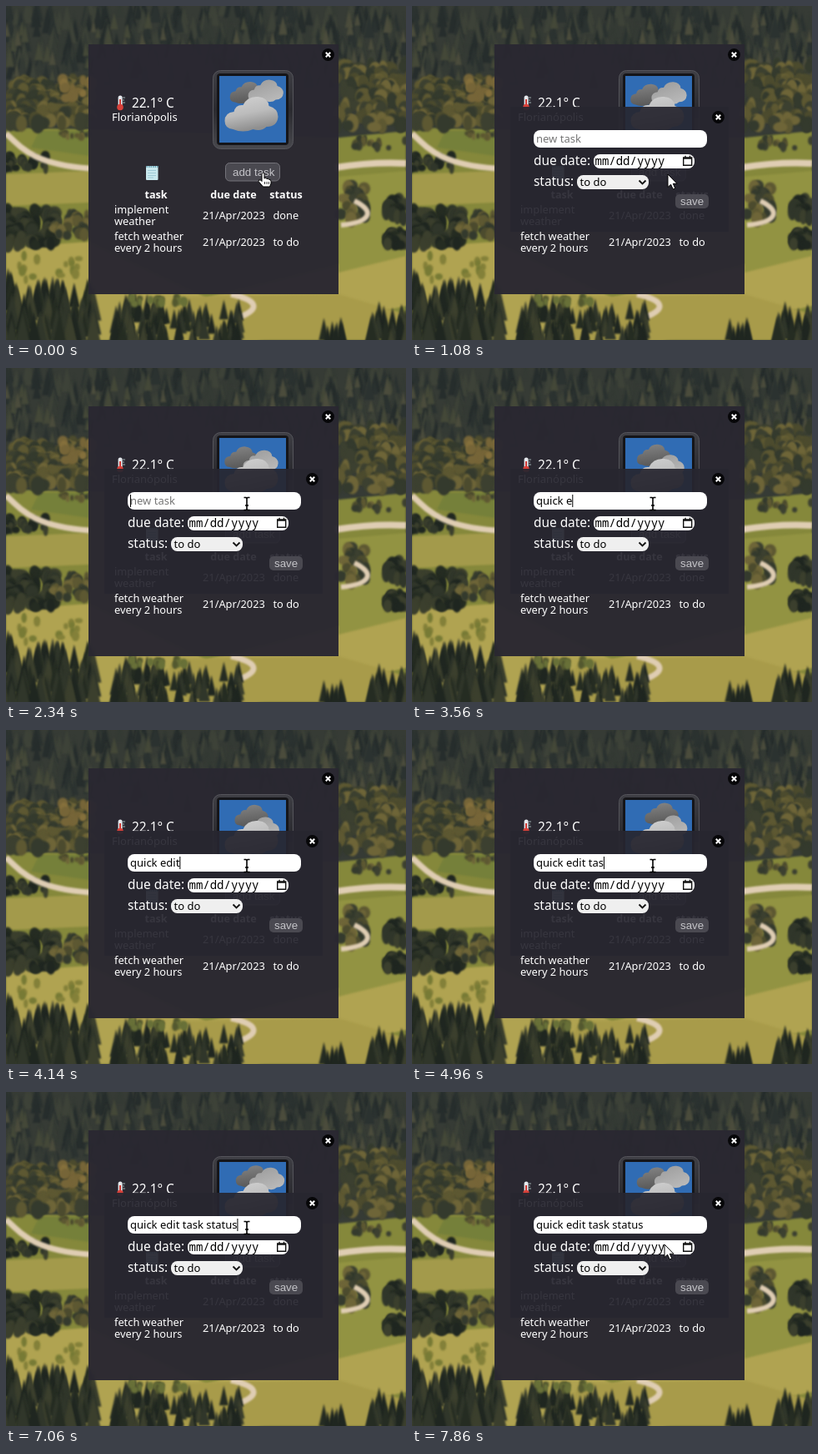
Recreate the animation shown at these times as an HTML page with a canvas. Size 480 by 401 pixels, loop 8 s.

```html
<!DOCTYPE html>
<html lang="en">
<head>
<meta charset="utf-8">
<title>Weather and tasks</title>
<style>
html, body { margin: 0; width: 100%; height: 100%; overflow: hidden; background: #3b3d33; }
canvas, svg { position: absolute; left: 0; top: 0; width: 480px; height: 401px; }
text { font: 12.8px "Noto Sans", "Open Sans", sans-serif; fill: #fff; white-space: pre; }
.big { font-size: 15.4px; }
.head { font-weight: bold; font-size: 12.6px; text-anchor: middle; }
.btn { font: 13.33px "Liberation Sans", Arial, sans-serif; fill: #c4c4c8; }
.field { font-size: 13px; fill: #000; }
.mono { font: 14px "Noto Sans Mono", "DejaVu Sans Mono", monospace; fill: #000; }
</style>
</head>
<body>
<canvas id="photo" width="480" height="401"></canvas>
<svg viewBox="0 0 480 401">
  <defs>
    <linearGradient id="light" x2=".3" y2="1"><stop stop-color="#d2d2d2"/><stop offset=".55" stop-color="#bcbcbc"/><stop offset="1" stop-color="#8f8f8f"/></linearGradient>
    <linearGradient id="mid" x2=".6" y2="1"><stop stop-color="#999"/><stop offset="1" stop-color="#b9b9b9"/></linearGradient>
    <linearGradient id="dark" x2=".2" y2="1"><stop stop-color="#858585"/><stop offset="1" stop-color="#5a5a5a"/></linearGradient>
    <linearGradient id="rim" x2="0" y2="1"><stop stop-color="#3f3f45"/><stop offset=".5" stop-color="#2b2b30"/><stop offset="1" stop-color="#48484d"/></linearGradient>
    <clipPath id="sky"><rect x="256" y="84" width="80" height="80"/></clipPath>
    <path id="cloud" d="M10 40Q0 39 0 30Q0 20 11 19Q13 10 22 11Q27 0 40 1Q52 2 53 12Q64 15 64 25Q63 37 50 37Q44 43 34 40Q22 45 10 40Z"/>
    <g id="close"><circle r="7.4" fill="#060608"/><path d="M-2.7-2.7 2.7 2.7M2.7-2.7-2.7 2.7" stroke="#fff" stroke-width="2"/></g>
  </defs>

  <rect x="99" y="46" width="300" height="300" fill="#2a2831" fill-opacity=".97"/>
  <use href="#close" x="386.5" y="58.5"/>

  <g>
    <rect x="134.6" y="107.5" width="5" height="14" rx="2.5" fill="#e6eaee"/>
    <path d="M137 112v8" stroke="#cf3a35" stroke-width="2"/>
    <path d="M140 110h3M140 113h2M140 116h3" stroke="#9aa"/>
    <circle cx="137" cy="121.5" r="3.8" fill="#d8413a"/>
  </g>
  <text class="big" x="151" y="121.5">22.1° C</text>
  <text x="127" y="138" style="font-size:13px">Florianópolis</text>

  <rect x="248.5" y="77.5" width="96" height="94" rx="9" fill="url(#rim)" stroke="#55555b"/>
  <rect x="253" y="81" width="86" height="86" rx="4" fill="#151519"/>
  <rect x="256" y="84" width="80" height="80" fill="#306cb4"/>
  <g clip-path="url(#sky)">
    <use id="darkCloud" href="#cloud" fill="url(#dark)"/>
    <use id="midCloud" href="#cloud" fill="url(#mid)"/>
    <use href="#cloud" x="262.5" y="108" fill="url(#light)"/>
  </g>

  <g>
    <rect x="168" y="192" width="14.5" height="17" rx="1" fill="#c9e9ee"/>
    <path d="M168.5 193h14" stroke="#6aa3b5" stroke-width="2" stroke-dasharray="1.5 1"/>
    <path d="M170 197.5h10M170 200.5h10M170 203.5h10M170 206h7" stroke="#93c3d0" stroke-width=".8"/>
  </g>
  <rect id="add" x="263.5" y="188.5" width="65" height="21.5" rx="5" fill="#4a4950" stroke="#74737a"/>
  <text class="btn" x="272" y="204">add task</text>

  <text class="head" x="180" y="231">task</text>
  <text class="head" x="273" y="231">due date</text>
  <text class="head" x="336" y="231">status</text>
  <text x="130" y="249">implement</text><text x="130" y="263">weather</text>
  <text x="236" y="256">21/Apr/2023</text><text x="320.5" y="256">done</text>
  <text x="130" y="281">fetch weather</text><text x="130" y="295">every 2 hours</text>
  <text x="236" y="288">21/Apr/2023</text><text x="320.5" y="288">to do</text>

  <g id="form">
    <rect x="118" y="121" width="262" height="150" fill="#272630" fill-opacity=".93"/>
    <use href="#close" x="367.5" y="133.5"/>
    <rect x="146" y="149" width="208" height="21" rx="8" fill="#fff"/>
    <text id="entry" class="field" x="149" y="164"></text>
    <rect id="caret" y="152" width="1" height="15"/>
    <text class="big" x="146" y="191">due date:</text>
    <rect x="218" y="178" width="121" height="17" rx="7.5" fill="#fff"/>
    <text class="mono" x="219.5" y="191">mm/dd/yyyy</text>
    <path d="M325.7 182h10v9.3h-10zM325.7 183h10M328 179.8v2M333.5 179.8v2" fill="none" stroke="#111" stroke-width="1.4"/>
    <text class="big" x="146" y="216">status:</text>
    <rect x="198" y="203" width="86" height="17" rx="7.5" fill="#efefef"/>
    <text class="field" x="201.5" y="216">to do</text>
    <path d="M272.5 209.5l4 4 4-4" fill="none" stroke="#111" stroke-width="1.8"/>
    <rect x="316" y="226" width="40" height="17" rx="5" fill="#4a4951"/>
    <text class="btn" x="322" y="239">save</text>
  </g>

  <g id="hand" transform="translate(307,200)" fill="#fff" stroke="#000">
    <path d="M0 1.5Q1.5-1 3 1.5V7Q5 5.500 6 7.500Q8 6.500 8.700 8.500Q11 8 11 10.500V13L9.500 17H1.500L-4 10.500Q-4 8 -1.500 9L0 10.500Z"/>
    <path d="M3.500 11v3M6 11v3M8.300 11v3" stroke-width=".8"/>
  </g>
  <path id="arrow" d="M0 0V15.500L3.600 12.200 6.200 18 8.800 16.900 6.300 11.300H11Z" fill="#fff" stroke="#000"/>
  <path id="beam" d="M-3.500-7.500H-1L0-6.500 1-7.500H3.500M0-6.500V6.500M-3.500 7.500H-1L0 6.500 1 7.500H3.500M-2 2H2" fill="none" stroke="#000" stroke-width="1.6"/>
</svg>
<script>
const $ = id => document.getElementById(id);

// Landscape in soft flat shapes
function paintPhoto() {
  const c = $('photo').getContext('2d');
  let seed = 7;
  const rnd = (a, b) => {
    seed = (seed * 16807) % 2147483647;
    return a + (b - a) * seed / 2147483647;
  };
  const pick = list => list[Math.floor(rnd(0, list.length))];
  const poly = (color, ...p) => {
    c.fillStyle = color;
    c.beginPath();
    for (let i = 0; i < p.length; i += 2) c.lineTo(p[i], p[i + 1]);
    c.fill();
  };
  const road = (width, ...p) => {
    c.strokeStyle = '#dfcdb3';
    c.lineWidth = width;
    c.beginPath();
    c.moveTo(p[0], p[1]);
    c.bezierCurveTo(...p.slice(2));
    c.stroke();
  };
  const bushes = (n, x0, y0, x1, y1, r, colors) => {
    for (let i = 0; i < n; i++) {
      c.fillStyle = pick(colors);
      c.beginPath();
      c.ellipse(rnd(x0, x1), y0 + (y1 - y0) * i / n, r * rnd(.5, 1), r * rnd(.6, 1.3), 0, 0, 7);
      c.fill();
    }
  };
  const firs = (n, x0, y0, x1, y1, h, colors) => {
    for (let i = 0; i < n; i++) {
      const x = rnd(x0, x1), y = y0 + (y1 - y0) * i / n, s = h * rnd(.7, 1.2);
      poly(pick(colors), x, y - s, x + s * .3, y + s * .3, x - s * .3, y + s * .3);
    }
  };
  const night = ['#2b3230', '#343a34', '#3d4238', '#262d2c'];
  const olive = ['#4c4b2e', '#5d5832', '#3c4030', '#6e6538', '#343a2d'];
  const deep = ['#252c22', '#30362a', '#1f2620', '#3b3f2d'];

  c.filter = 'blur(.8px)';
  c.fillStyle = '#363b35';
  c.fillRect(0, 0, 480, 401);
  firs(420, 0, 5, 480, 95, 20, night);
  firs(60, 0, 20, 480, 90, 15, ['#4b4c3c', '#444838']);
  poly('#85883b', 0, 146, 100, 148, 400, 158, 480, 150, 480, 401, 0, 401);
  poly('#a39a4b', 0, 202, 100, 198, 100, 236, 0, 240);
  poly('#75803a', 40, 150, 100, 150, 100, 180, 30, 170);
  poly('#b0a351', 0, 290, 100, 283, 240, 350, 480, 290, 480, 360, 300, 401, 60, 401, 0, 350);
  poly('#929342', 399, 205, 480, 198, 480, 300, 399, 320);
  poly('#a89b4a', 200, 350, 399, 346, 480, 370, 480, 401, 180, 401);
  bushes(170, 0, 92, 105, 142, 9, olive);
  bushes(130, 395, 70, 485, 146, 9, olive);
  bushes(14, 68, 88, 104, 112, 7, ['#85703c', '#766538']);
  bushes(26, 0, 180, 48, 196, 6, deep);
  bushes(12, 60, 152, 100, 158, 4, olive);
  bushes(75, 0, 246, 60, 288, 9, deep);
  bushes(35, 58, 250, 99, 276, 7, olive);
  bushes(14, 404, 160, 480, 171, 5, olive);
  bushes(26, 400, 216, 432, 258, 8, olive);
  bushes(16, 455, 232, 480, 256, 8, deep);
  bushes(20, 457, 272, 480, 288, 8, deep);
  bushes(18, 0, 300, 90, 330, 5, ['#838039', '#777a35']);
  road(7, 0, 153, 20, 172, 35, 190, 100, 195);
  road(8, 395, 194, 420, 190, 445, 187, 480, 189);
  road(6, 402, 263, 436, 260, 445, 247, 418, 234);
  road(7, 270, 346, 302, 353, 310, 365, 270, 377);
  firs(90, -5, 350, 105, 405, 31, deep);
  firs(42, 130, 366, 185, 410, 24, deep);
  firs(45, 185, 370, 285, 408, 20, deep);
  firs(8, 380, 395, 405, 408, 20, deep);
  firs(22, 438, 382, 480, 408, 26, deep);
  bushes(18, 150, 350, 215, 358, 5, ['#687038', '#53582f']);
}

const phrase = 'quick edit task status';
const keys = [2480, 2620, 2800, 2960, 3160, 3400, 3550, 3720, 3860, 4000, 4160,
  4730, 4820, 4940, 5120, 5360, 5700, 5900, 6080, 6400, 6640, 6940];
const FOCUS = 2000;
const ramp = (t, a, b) => {
  const p = Math.min(1, Math.max(0, (t - a) / (b - a)));
  return p * p * (3 - 2 * p);
};
const show = (id, on) => $(id).setAttribute('display', on ? 'inline' : 'none');
const place = (id, x, y, s = 1) => $(id).setAttribute('transform', `translate(${x} ${y}) scale(${s})`);

function drawClouds(t) {
  // The sky stalls while the machine is busy
  if (t > 540 && t < 1080) t = 540;
  if (t > 4220 && t < 4720) t = 4220;
  const wave = peak => Math.cos((Math.min(t, 7860) - peak) * Math.PI / 4000);
  place('darkCloud', 271 - 10 * wave(1700), 90 + 4 * wave(1900), .63);
  place('midCloud', 288 + 4 * wave(6900), 96 - 8 * wave(0), .66);
}

function drawEntry(t) {
  const count = keys.filter(k => k <= t).length;
  const entry = $('entry');
  const typed = phrase.slice(0, count);
  entry.textContent = typed || 'new task';
  entry.style.fill = typed ? '#000' : '#757575';
  const last = count ? keys[count - 1] : FOCUS;
  show('caret', t >= FOCUS && (t - last) % 1000 < 500);
  $('caret').setAttribute('x', 149 + (count ? entry.getComputedTextLength() : 0));
}

function drawPointer(t, open) {
  const go = ramp(t, 1150, 1850), leave = ramp(t, 7220, 7840);
  const x = 307 - 18 * go + 14 * leave, y = 202 - 39 * go + 20 * leave;
  const inField = y < 170;
  show('hand', !open);
  show('arrow', open && !inField);
  show('beam', open && inField);
  place('arrow', x, y);
  place('beam', x, y);
}

function frame(now) {
  const t = now % 8000, open = t >= 1080;
  drawClouds(t);
  $('add').setAttribute('fill', t > 300 && !open ? '#424148' : '#4a4950');
  show('form', open);
  if (open) drawEntry(t);
  drawPointer(t, open);
  requestAnimationFrame(frame);
}

paintPhoto();
const start = performance.now();
const tick = () => frame(performance.now() - start);
requestAnimationFrame(function loop() {
  tick();
});
</script>
</body>
</html>
```
